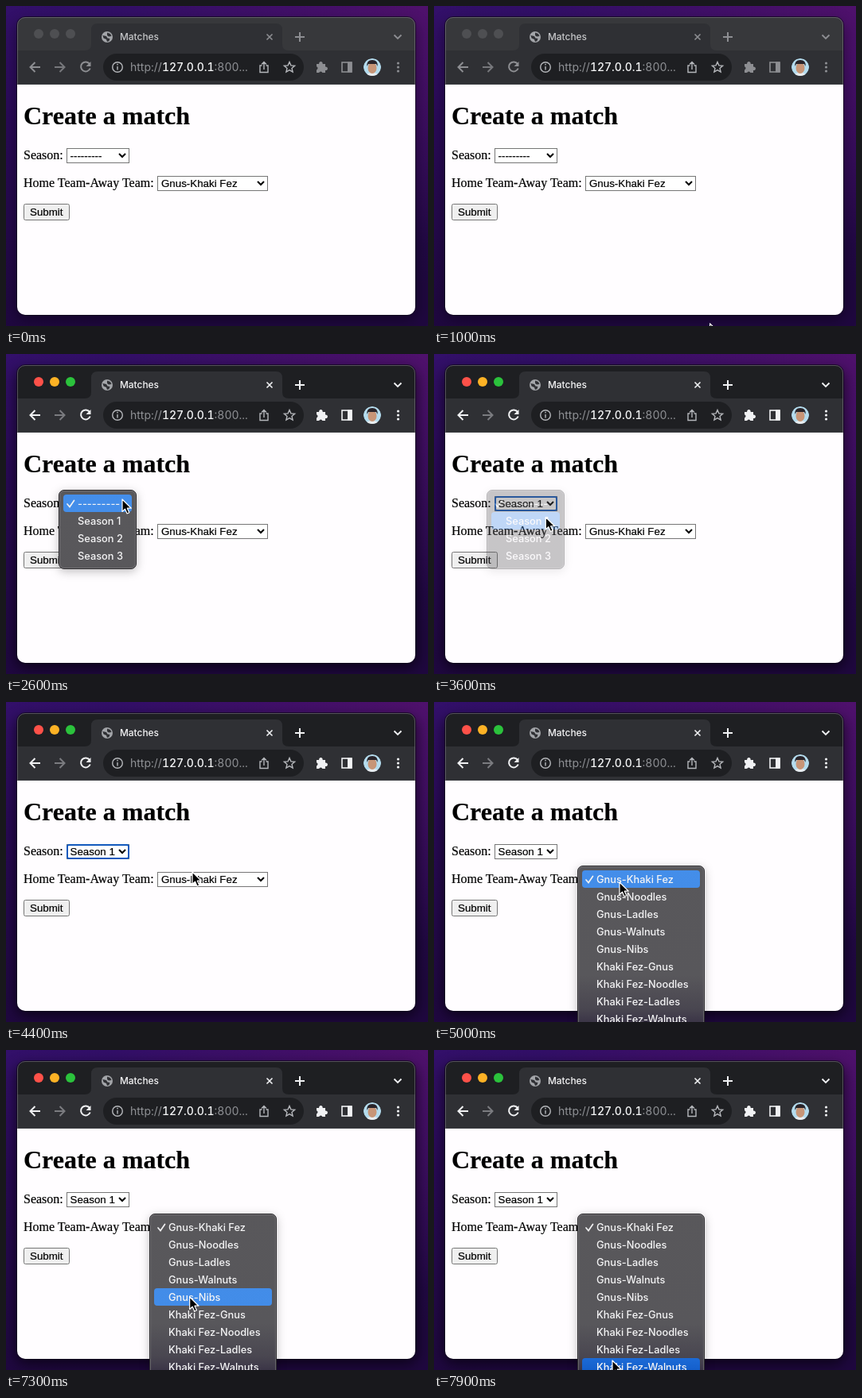
Animation, 530 px wide and 403 px high, one loop 8000 ms. Source, as an HTML page:

```html
<!DOCTYPE html>
<html lang="en">
<head>
<meta charset="utf-8">
<title>Matches</title>
<style>
html, body { margin: 0; width: 100%; height: 100%; overflow: hidden; background: #240a48; }
svg { display: block; width: 530px; height: 403px; }
text { white-space: pre; }
.ui { font-family: Inter, Roboto, sans-serif; }
.serif { font-family: "Liberation Serif", "Times New Roman", serif; font-size: 16px; }
.serif .title { font-size: 32px; font-weight: 700; }
.form { font-family: "Liberation Sans", Arial, sans-serif; font-size: 13.33px; }
.serif text, .form text { stroke: #000; stroke-width: .2px; }
.menu text { font: 500 12.8px Inter, Roboto, sans-serif; fill: #f4f4f5; }
.line { fill: none; stroke-width: 2; }
#win { --strip: #1e1f22; --icon: #f1f2f4; --title: #f6f6f7; --faint: #7b7c80; --red: #fe5149; --amber: #fdb225; --green: #2bc23c; }
#win.idle { --strip: #37383b; --icon: #8d8e92; --title: #c6c7c9; --faint: #77787c; --red: #4e4f52; --amber: #4e4f52; --green: #4e4f52; }
.icon { stroke: var(--icon); }
.fill { fill: var(--icon); }
#shadow { filter: blur(9px); }
.drop { filter: drop-shadow(0 3px 6px rgba(0, 0, 0, .25)); }
</style>
</head>
<body>
<svg viewBox="0 0 530 403">
  <defs>
    <linearGradient id="wall" x1="0" y1="0" x2=".15" y2="1">
      <stop offset="0" stop-color="#33106a"/><stop offset=".35" stop-color="#2a0a58"/><stop offset="1" stop-color="#1f083f"/>
    </linearGradient>
    <radialGradient id="glow" cx="1" cy="0" r=".75">
      <stop offset="0" stop-color="#4f116c"/><stop offset="1" stop-color="#4f116c" stop-opacity="0"/>
    </radialGradient>
    <linearGradient id="glass" gradientUnits="userSpaceOnUse" x1="0" y1="170" x2="0" y2="403">
      <stop offset="0" stop-color="#59585b"/><stop offset=".75" stop-color="#58575b"/><stop offset=".93" stop-color="#494650"/><stop offset="1" stop-color="#3b3547"/>
    </linearGradient>
    <linearGradient id="pick" gradientUnits="userSpaceOnUse" x1="0" y1="170" x2="0" y2="403">
      <stop offset="0" stop-color="#448eea"/><stop offset=".75" stop-color="#428ce8"/><stop offset=".95" stop-color="#1a68d4"/><stop offset="1" stop-color="#145fcb"/>
    </linearGradient>
    <clipPath id="frame"><rect x="14" y="14" width="500" height="375" rx="10"/></clipPath>
    <clipPath id="bars"><rect x="14" y="14" width="500" height="85"/></clipPath>
    <clipPath id="face"><circle cx="460" cy="77" r="11"/></clipPath>
  </defs>

  <rect width="530" height="403" fill="url(#wall)"/>
  <rect width="530" height="403" fill="url(#glow)"/>
  <rect id="shadow" x="12" y="20" width="504" height="375" rx="12"/>

  <g id="win">
    <rect x="13.500" y="13.500" width="501" height="376" rx="10.500" fill="none" stroke="#0c0418" stroke-opacity=".7"/>
    <g clip-path="url(#frame)">
      <rect x="14" y="14" width="500" height="43" fill="var(--strip)"/>
      <path d="M99 56q8 0 8-8V30q0-8 8-8H339q8 0 8 8V48q0 8 8 8H514V99H14V56Z" fill="#2f3034"/>
      <rect x="14" y="98" width="500" height="1" fill="#3c3d41"/>
      <rect x="14" y="99" width="500" height="290" fill="#fffdff"/>
    </g>
    <rect x="14.500" y="14.500" width="499" height="374" rx="9.500" fill="none" stroke="#8b8892" stroke-opacity=".5" clip-path="url(#bars)"/>

    <circle cx="41" cy="35" r="6" fill="var(--red)"/>
    <circle cx="61" cy="35" r="6" fill="var(--amber)"/>
    <circle cx="81" cy="35" r="6" fill="var(--green)"/>

    <circle cx="127" cy="39" r="7" fill="#a3a5a9"/>
    <path d="M121.500 37l4.500 1 1.500 2.500 3 .5-1 3-2.500 1-1-3-3.500-1.500zM127 33.500l4 1.500 1.500 3-3.500.500-2-1.500z" fill="#2f3034"/>
    <text class="ui" x="143" y="43.300" font-size="11.900" font-weight="500" fill="var(--title)">Matches</text>
    <g class="line icon">
      <path d="M327.500 35.500l7 7m0-7l-7 7" stroke-width="1.600"/>
      <path d="M369 33v12m-6-6h12"/>
      <path d="M487.500 36.500l4.500 4.500 4.500-4.500" stroke-width="1.800"/>
      <path d="M43 77H30.500m6-6l-6 6 6 6"/>
      <path d="M105 73a6 6 0 1 0 .700 5.500"/>
      <rect x="422" y="71" width="12" height="12" stroke-width="1.600"/>
    </g>
    <path class="line" d="M61 77h12.500m-6-6l6 6-6 6" stroke="var(--faint)"/>
    <path class="fill" d="M106.500 70v6h-6zM429 70.500h5.500v13H429z"/>
    <path class="fill" d="M390 73h3.200a2.300 2.300 0 1 1 4.400 0h3.400v3.600a2.300 2.300 0 1 1 0 4.400v3h-3.600a2.200 2.200 0 0 0-4.200 0H390v-3.600a2.200 2.200 0 0 0 0-4.200z"/>
    <g class="fill">
      <circle cx="492.500" cy="72" r="1.600"/><circle cx="492.500" cy="77" r="1.600"/><circle cx="492.500" cy="82" r="1.600"/>
    </g>

    <rect x="122" y="60" width="252" height="34" rx="17" fill="#1e1f22"/>
    <g class="line" stroke="#b5b7bb" style="stroke-width:1.4px">
      <circle cx="140" cy="77" r="6.300"/>
      <path d="M140 76v4.500m0-7.700v1.600"/>
      <path d="M321.500 75H319v8.500h10V75h-2.500M324 80v-9.500m-3 3l3-3 3 3"/>
      <path d="M356 70.500l1.900 4.400 4.700.400-3.600 3.100 1.100 4.600-4.100-2.400-4.100 2.400 1.100-4.600-3.600-3.100 4.700-.400z"/>
    </g>
    <text class="ui" x="156" y="82" font-size="14" fill="#8f9195" style="font-feature-settings:'tnum'">http://<tspan fill="#f4f5f6" font-weight="500">127.0.0.1</tspan>:800...</text>

    <g clip-path="url(#face)">
      <circle cx="460" cy="77" r="11" fill="#b4dcee"/>
      <ellipse cx="460" cy="89" rx="9" ry="5" fill="#e9edf0"/>
      <ellipse cx="460" cy="78" rx="5.500" ry="7" fill="#c79577"/>
      <path d="M453.500 76q-1-8 6.500-8t6.500 8l-1.500-3h-10z" fill="#29242a"/>
    </g>
  </g>

  <g class="serif">
    <text class="title" x="22" y="149">Create a match</text>
    <text x="22" y="193">Season:</text>
    <text x="22" y="228">Home Team-Away Team:</text>
  </g>
  <g class="form">
    <rect x="76.500" y="179.500" width="78" height="18" fill="#fff" stroke="#767676"/>
    <rect id="ring" x="77" y="180" width="77" height="17" rx="2" fill="none" stroke="#1259bd" stroke-width="2"/>
    <text id="season" x="80.500" y="193"></text>
    <path class="line" d="M142 186l4 4 4-4" stroke="#000"/>
    <rect x="190.500" y="214.500" width="138" height="18" fill="#fff" stroke="#767676"/>
    <text id="teams" x="195" y="228"></text>
    <path class="line" d="M316 221l4 4 4-4" stroke="#000"/>
    <rect x="22.500" y="249.500" width="57" height="20" rx="2" fill="#efefef" stroke="#767676"/>
    <text x="30" y="264">Submit</text>
  </g>

  <g id="menus"></g>
  <path id="cursor" d="M0 0V15.500l3.500-3.300 2.600 5.800 2.700-1.200-2.500-5.600h5z" fill="#000" stroke="#fff" stroke-width="1.200" stroke-linejoin="round"/>
</svg>
<script>
const $ = id => document.getElementById(id);
const LOOP = 8000, STEP = 100, ROW = 22, BLANK = "---------";

function add(parent, tag, attrs, label) {
  const el = document.createElementNS("http://www.w3.org/2000/svg", tag);
  for (const k in attrs) el.setAttribute(k, attrs[k]);
  if (label) el.textContent = label;
  return parent.appendChild(el);
}

// mid is the centre line of the first row
function makeMenu(x, mid, width, items) {
  const g = add($("menus"), "g", { class: "menu" });
  add(g, "rect", {
    class: "drop", x: x + .5, y: mid - 16.5, width: width - 1, height: items.length * ROW + 11,
    rx: 6.5, fill: "url(#glass)", stroke: "#2c2b2e"
  });
  add(g, "rect", {
    x: x + 1.5, y: mid - 15.5, width: width - 3, height: items.length * ROW + 9,
    rx: 5.5, fill: "none", stroke: "#858488", "stroke-opacity": .55
  });
  const bar = add(g, "rect", { x: x + 6, width: width - 12, height: ROW, rx: 4, fill: "url(#pick)" });
  add(g, "path", {
    d: `M${x + 11} ${mid + 1}l3 3.500 5.500-8`, fill: "none", stroke: "#f1f1f2",
    "stroke-width": 1.7, "stroke-linecap": "round"
  });
  items.forEach((s, i) => add(g, "text", { x: x + 24, y: mid + i * ROW + 4.6 }, s));

  return (alpha, y, lit = true) => {
    const row = Math.max(0, Math.min(items.length - 1, Math.round((y - mid) / ROW)));
    g.style.display = alpha > 0 ? "" : "none";
    g.style.opacity = alpha;
    bar.setAttribute("y", mid + row * ROW - 11);
    bar.style.display = lit ? "" : "none";
  };
}

const clubs = ["Gnus", "Khaki Fez", "Noodles", "Ladles", "Walnuts", "Nibs"];
const pairs = clubs.flatMap(a => clubs.filter(b => b !== a).map(b => a + "-" + b)).slice(0, 10);
const seasonMenu = makeMenu(66, 188, 98, [BLANK, "Season 1", "Season 2", "Season 3"]);
const teamMenu = makeMenu(180, 223, 160, pairs);
$("teams").textContent = pairs[0];

// time, x, y of the pointer tip
const path = [
  [900, 352, 410], [1400, 300, 313], [1800, 300, 313], [2300, 146, 183], [2600, 146, 183],
  [3000, 130, 207], [3500, 130, 207], [4000, 229, 193], [4300, 229, 193], [4400, 234, 214],
  [4500, 233, 227], [5800, 233, 227], [6500, 234, 271], [6700, 234, 276], [6900, 233, 283],
  [7000, 233, 283], [7900, 224, 391], [8000, 224, 391]
];

function pointer(t) {
  const i = path.findIndex(p => p[0] >= t);
  if (i < 1) return path[0].slice(1);
  const [t0, x0, y0] = path[i - 1], [t1, x1, y1] = path[i];
  const u = (t - t0) / (t1 - t0), e = u * u * (3 - 2 * u);
  return [x0 + (x1 - x0) * e, y0 + (y1 - y0) * e];
}

function draw(t) {
  const [x, y] = pointer(t);
  const idle = t < 1400, chosen = t >= 3500;
  $("win").setAttribute("class", idle ? "idle" : "");
  $("shadow").style.opacity = idle ? .4 : .65;
  $("cursor").setAttribute("transform", `translate(${x} ${y})`);
  $("cursor").style.display = t >= 1000 ? "" : "none";
  $("season").textContent = chosen ? "Season 1" : BLANK;
  $("ring").style.display = t >= 2500 && t < 4700 ? "" : "none";

  const fade = t < 2500 ? 0 : Math.max(0, Math.min(1, (3700 - t) / 300));
  seasonMenu(fade, y, t !== 3300);
  teamMenu(t >= 4700 ? 1 : 0, y);
}

const start = performance.now();
function tick() {
  const t = (performance.now() - start) % LOOP;
  draw(Math.floor(t / STEP) * STEP);
  requestAnimationFrame(tick);
}
tick();
</script>
</body>
</html>
```
